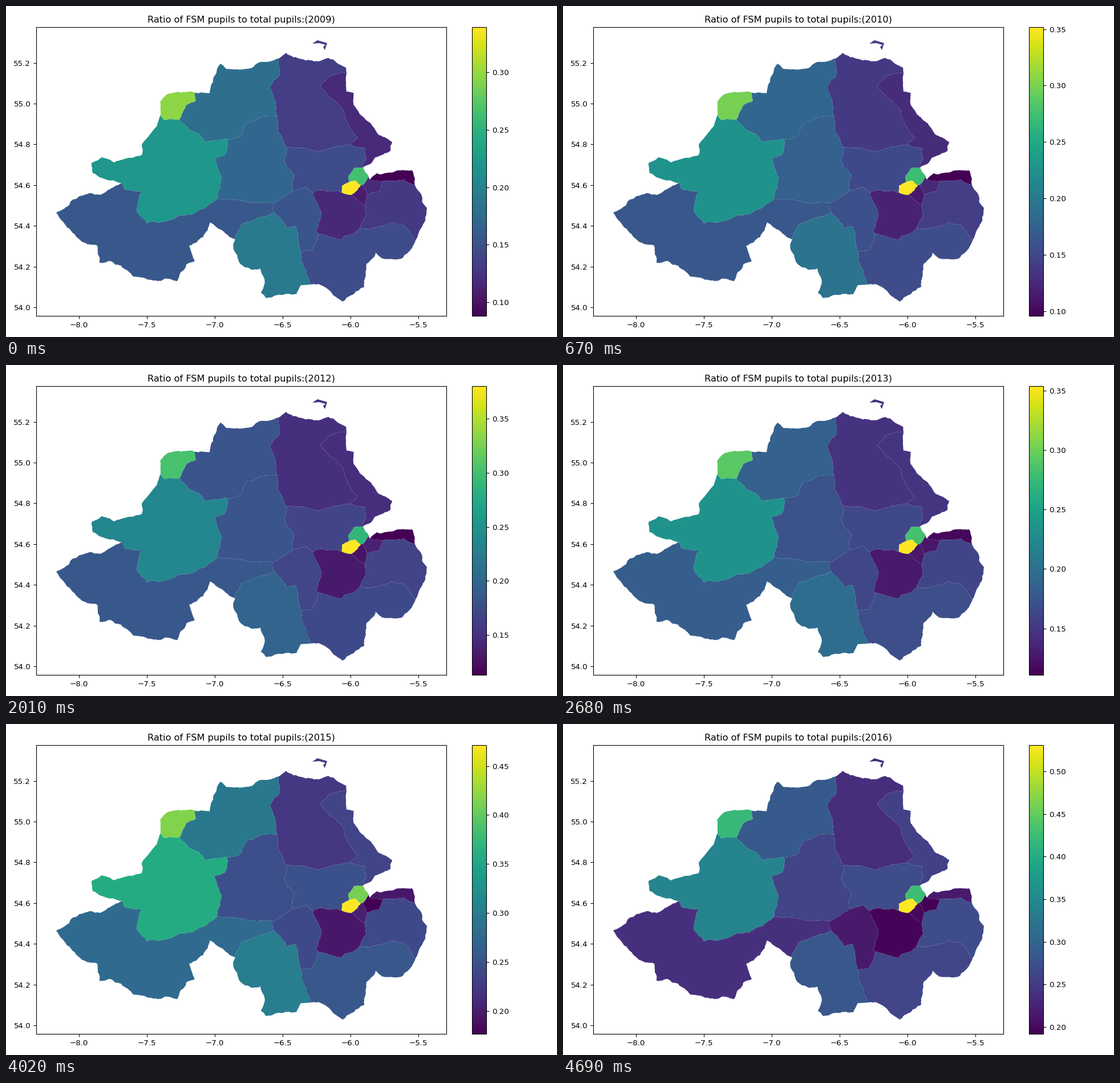
These frames come from a looping animation (966x580 px, 7370 ms). A matplotlib script:

```python
import math
import random
from itertools import combinations

import matplotlib.pyplot as plt
import numpy as np
from matplotlib.animation import FuncAnimation
from matplotlib.collections import PolyCollection
from matplotlib.ticker import MultipleLocator

W, H, DPI = 966, 580, 100
FIRST_YEAR, LAST_YEAR = 2009, 2016
SLOT_MS, SLOTS = 670, 11
LEFT, RIGHT, TOP, BOTTOM = 53, 772, 37, 543
REGIONS = "ABCDEFGHIJKLMNOPQR"

# Points, in stage pixels, where the named regions meet ("_" is the outside).
JUNCTIONS = {
    "_AE": (271, 191), "_AB": (331, 152), "ABE": (304, 199), "_BC": (478, 92),
    "BCF": (476, 194), "BEF": (388, 234), "_CD": (597, 118), "CDK": (602, 243),
    "CFK": (493, 248), "_DKM": (626, 283), "EFG": (370, 338), "_EG": (203, 310),
    "FGJ": (467, 346), "FJK": (503, 324), "GHJ": (470, 362), "_GH": (402, 409),
    "HIJ": (517, 431), "_HI": (534, 488), "IJL": (548, 399), "JKL": (538, 327),
    "ILR": (620, 389), "_IR": (718, 411), "KLN": (589, 327), "KMN": (601, 309),
    "LNO": (606, 331), "LOR": (629, 349), "MNO": (622, 314), "MOP": (625, 314),
    "_MP": (636, 299), "_PQ": (638, 304), "OPR": (633, 331), "PQR": (661, 307),
    "_QR": (717, 314),
}
# Main bends of the border between two regions, from its first junction to its second.
BENDS = {
    "_A": [(270, 168), (284, 154), (320, 150)],
    "_B": [(357, 153), (376, 101), (386, 110), (430, 109), (446, 98)],
    "_C": [(491, 82), (548, 97), (565, 91), (596, 108)],
    "_D": [(597, 150), (610, 152), (609, 172), (640, 206), (677, 238), (674, 254), (640, 276)],
    "_E": [(262, 213), (238, 243), (238, 261), (190, 274), (168, 265), (150, 275),
           (152, 293), (179, 305)],
    "_G": [(165, 331), (129, 333), (88, 362), (107, 388), (133, 413), (160, 420),
           (164, 450), (202, 455), (223, 474), (258, 481), (300, 482), (316, 453),
           (331, 447), (321, 420), (358, 379)],
    "_H": [(400, 429), (419, 458), (446, 460), (453, 478), (447, 503), (457, 512),
           (509, 505), (517, 489)],
    "_I": [(560, 493), (590, 518), (628, 492), (632, 452), (648, 432), (685, 444)],
    "_Q": [(650, 293), (712, 288)],
    "_R": [(735, 370), (738, 354), (728, 330)],
    "AB": [(333, 166), (317, 173)],
    "AE": [(277, 200)],
    "BC": [(480, 119), (463, 143)],
    "BE": [(321, 217), (350, 238)],
    "BF": [(444, 196), (423, 203), (413, 226)],
    "CD": [(574, 121), (551, 141), (567, 160), (592, 182), (599, 206), (617, 230)],
    "DK": [(630, 250)],
    "EF": [(383, 261), (365, 268), (378, 300)],
    "EG": [(320, 365), (247, 381), (229, 358), (238, 325), (208, 321)],
    "FK": [(487, 271), (506, 296)],
    "GH": [(440, 372), (413, 383)],
    "HJ": [(492, 390), (508, 386)],
    "IJ": [(536, 428)],
    "IL": [(587, 410)],
    "IR": [(655, 387), (697, 384)],
    "JK": [(527, 317)],
    "JL": [(543, 395), (553, 370)],
    "KM": [(610, 284), (600, 298)],
    "KN": [(589, 315)],
    "LR": [(632, 368)],
    "MN": [(612, 306)],
    "PR": [(655, 325)],
    "QR": [(697, 304)],
}
ISLAND = [(537, 66), (546, 60), (563, 65), (559, 77), (556, 72), (560, 68), (549, 65)]

# Colour range of each known year, and region levels within it at a few key years.
LIMITS = {2009: (.0881, .3392), 2011: (.1039, .3644), 2012: (.1131, .3801),
          2013: (.1109, .3538), 2015: (.1764, .4713), 2016: (.1920, .5308)}
KEY_YEARS = [2009, 2012, 2015, 2016]
LEVELS = {
    "A": (.83, .71, .81, .67), "B": (.36, .26, .40, .28), "C": (.18, .14, .16, .13),
    "D": (.12, .13, .20, .19), "E": (.53, .46, .61, .45), "F": (.33, .26, .24, .20),
    "G": (.27, .27, .34, .14), "H": (.41, .32, .42, .27), "I": (.23, .22, .27, .21),
    "J": (.26, .21, .22, .07), "K": (.23, .20, .25, .23), "L": (.11, .07, .06, .01),
    "M": (.70, .66, .79, .69), "N": (1, 1, 1, 1), "O": (.08, .05, .09, .02),
    "P": (.12, .09, 0, 0), "Q": (0, 0, .06, .07), "R": (.17, .20, .22, .23),
}


def to_degrees(points):
    x, y = np.asarray(points, float).T
    return np.column_stack([-8 + (x - 128.2) / 238.05, 55.2 - (y - 99.6) / 357.1])


def roughen(a, b, rng):
    """Fractal line from a to b, without a itself."""
    dx, dy = b[0] - a[0], b[1] - a[1]
    if math.hypot(dx, dy) < 5:
        return [b]
    shift = max(-0.15, min(0.15, rng.gauss(0, 0.06)))
    middle = ((a[0] + b[0]) / 2 - shift * dy, (a[1] + b[1]) / 2 + shift * dx)
    return roughen(a, middle, rng) + roughen(middle, b, rng)


def border_lines(rng):
    lines = {}
    for pair in combinations("_" + REGIONS, 2):
        ends = [p for name, p in JUNCTIONS.items() if set(pair) <= set(name)]
        if len(ends) == 2:
            key = "".join(pair)
            stops = [ends[0], *BENDS.get(key, []), ends[1]]
            lines[key] = stops[:1] + [p for a, b in zip(stops, stops[1:])
                                      for p in roughen(a, b, rng)]
    return lines


def outline(region, lines):
    """Join every border of the region into one ring."""
    parts = [line for key, line in lines.items() if region in key]
    ring = list(parts.pop())
    while parts:
        part = next(p for p in parts if ring[-1] in (p[0], p[-1]))
        parts.remove(part)
        ring += part[1:] if part[0] == ring[-1] else part[-2::-1]
    return ring


def axes_at(left, right):
    return fig.add_axes([left / W, 1 - BOTTOM / H, (right - left) / W, (BOTTOM - TOP) / H])


plt.rcParams["font.size"] = 9.66
fig = plt.figure(figsize=(W / DPI, H / DPI), dpi=DPI, facecolor="white")
ax = axes_at(LEFT, RIGHT)
(west, north), (east, south) = to_degrees([(LEFT, TOP), (RIGHT, BOTTOM)])
ax.set(xlim=(west, east), ylim=(south, north))
for axis, step in ((ax.xaxis, 0.5), (ax.yaxis, 0.2)):
    axis.set_major_locator(MultipleLocator(step))
    axis.set_major_formatter("{x:.1f}")

lines = border_lines(random.Random(4))
shapes = [outline(region, lines) for region in REGIONS] + [ISLAND]
owners = REGIONS + "C"
regions = PolyCollection([to_degrees(s) for s in shapes], cmap="viridis",
                         edgecolors="none", linewidths=0)
regions.set_array(np.zeros(len(shapes)))
regions.set_clim(*LIMITS[FIRST_YEAR])
ax.add_collection(regions, autolim=False)
fig.colorbar(regions, cax=axes_at(817, 842.3), ticks=MultipleLocator(0.05), format="%.2f")
title = ax.set_title("")


def draw(slot):
    year = min(FIRST_YEAR + slot, LAST_YEAR)
    low, high = (np.interp(year, list(LIMITS), ends) for ends in zip(*LIMITS.values()))
    levels = np.array([np.interp(year, KEY_YEARS, LEVELS[name]) for name in owners])
    regions.set_array(low + (high - low) * levels)
    regions.set_clim(low, high)
    title.set_text(f"Ratio of FSM pupils to total pupils:({year})")
    return regions, title


anim = FuncAnimation(fig, draw, frames=SLOTS, interval=SLOT_MS, repeat=True,
                     repeat_delay=0, blit=False)
plt.show()
```
